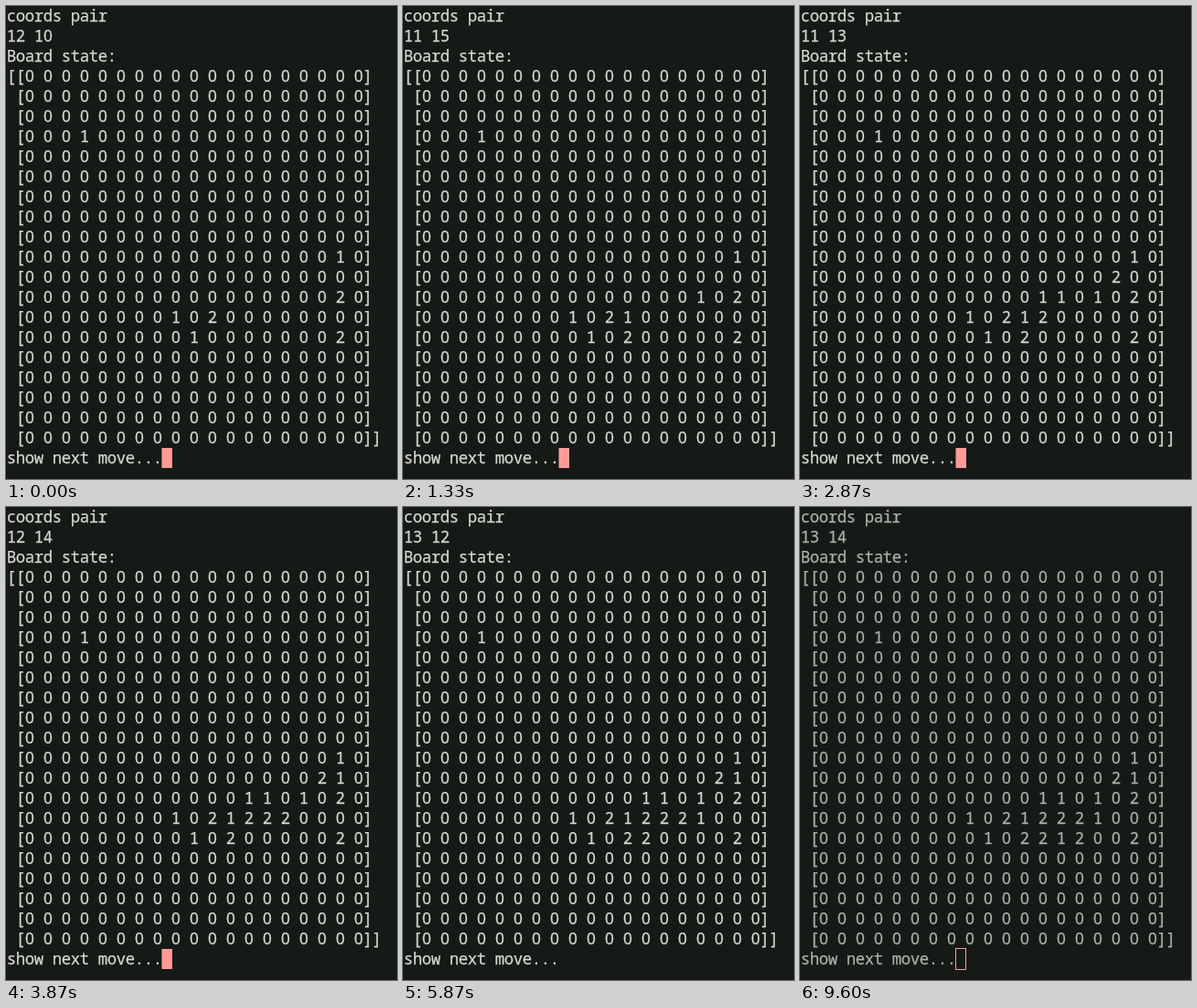
An HTML page for the animation above (9.66 s loop, 428 by 518 pixels).

```html
<!DOCTYPE html>
<html lang="en">
<head>
<meta charset="utf-8">
<title>Board moves in a terminal</title>
<style>
  html, body { margin: 0; width: 100%; height: 100%; overflow: hidden; background: #161a17; }
  svg { display: block; --ink: #d5d9d1; }
  svg.blurred { --ink: #adb1aa; }
  text {
    font: 17.33px "Noto Sans Mono", "DejaVu Sans Mono", monospace;
    white-space: pre;
    text-anchor: middle;
    fill: var(--ink);
    stroke: var(--ink);
    stroke-width: 0.25px;
  }
  /* plain zero without a slash */
  .zero { font-family: "Noto Sans", "Open Sans", sans-serif; }
  #block { fill: #ff9a98; }
  #outline { fill: none; stroke: #ff9a98; }
</style>
</head>
<body>
<svg id="screen" width="428" height="518" viewBox="0 0 428 518">
  <rect id="block" width="11.5" height="22"/>
  <rect id="outline" x="170.5" y="483.5" width="11" height="23"/>
</svg>
<script>
const LOOP = 9660, BLUR_AT = 9600, BLINK = 600;
const SIZE = 19, LINES = 23, COLUMNS = 41;
const CELL_W = 10, CELL_H = 22, LEFT = 1, BASELINE = 17;
const PROMPT = 'show next move...';

// Players 1 and 2 take turns; the opening is on the board when the loop begins
const OPENING = '9,17 11,17 12,8 13,17 13,9 12,10';
const PLAY = '12,11 13,11 11,15 12,12 11,12 10,16 11,13 12,13 10,17 12,14 12,15 13,12 13,13 13,14';
const parse = text => text.split(' ').map(pair => pair.split(',').map(Number));
const opening = parse(OPENING), game = opening.concat(parse(PLAY));

// When each move of PLAY is printed
const PRINTS = [500, 1000, 1330, 1830, 2300, 2530, 2870, 3430, 3500, 3870, 4500, 5300, 6500, 8600];
// An echoed Enter scrolls one line until the next print
const ENTERS = [1300, 1770, 2830, 4200];
// Each key press shows the cursor and restarts its blinking
const KEYS = [-370, 400, 1000, 1300, 1770, 2300, 2830, 3430, 3870, 4170, 5270, 6300, 7900, 8600];

const screen = document.getElementById('screen');
const block = document.getElementById('block');
const outline = document.getElementById('outline');

// One x per character keeps every glyph centred in its cell
const centres = Array.from({ length: COLUMNS }, (_, i) => LEFT + (i + 0.5) * CELL_W).join(' ');
const rows = Array.from({ length: LINES }, (_, i) => {
  const row = document.createElementNS('http://www.w3.org/2000/svg', 'text');
  row.setAttribute('x', centres);
  row.setAttribute('y', i * CELL_H + BASELINE);
  return screen.appendChild(row);
});

const last = (times, t) => Math.max(-LOOP, ...times.filter(time => time <= t));

function linesAt(t) {
  const printed = PRINTS.filter(time => time <= t).length;
  const moves = game.slice(0, opening.length + printed);
  const grid = Array.from({ length: SIZE }, () => Array(SIZE).fill(0));
  grid[3][3] = 1;
  moves.forEach(([r, c], i) => { grid[r][c] = i % 2 + 1; });
  const board = grid.map((cells, i) =>
    (i ? ' [' : '[[') + cells.join(' ') + (i < SIZE - 1 ? ']' : ']]'));
  return ['coords pair', moves[moves.length - 1].join(' '), 'Board state:', ...board, PROMPT];
}

let shown = '';
function print(lines) {
  const text = lines.join('\n');
  if (text === shown) return;
  shown = text;
  rows.forEach((row, i) => {
    row.innerHTML = lines[i].replace(/0/g, '<tspan class="zero">0</tspan>');
  });
}

function draw(t) {
  const waiting = last(ENTERS, t) > last(PRINTS, t);
  const blurred = t >= BLUR_AT;
  const lit = Math.floor((t - last(KEYS, t)) / BLINK) % 2 === 0;
  const lines = linesAt(t);
  print(waiting ? [...lines.slice(1), ''] : lines);
  block.setAttribute('x', LEFT - 0.5 + (waiting ? 0 : PROMPT.length * CELL_W));
  block.setAttribute('y', (LINES - 1) * CELL_H);
  block.style.display = lit && !blurred ? '' : 'none';
  outline.style.display = blurred ? '' : 'none';
  screen.classList.toggle('blurred', blurred);
}

const begin = performance.now();
function tick() {
  draw((performance.now() - begin) % LOOP);
  requestAnimationFrame(tick);
}
tick();
</script>
</body>
</html>
```
